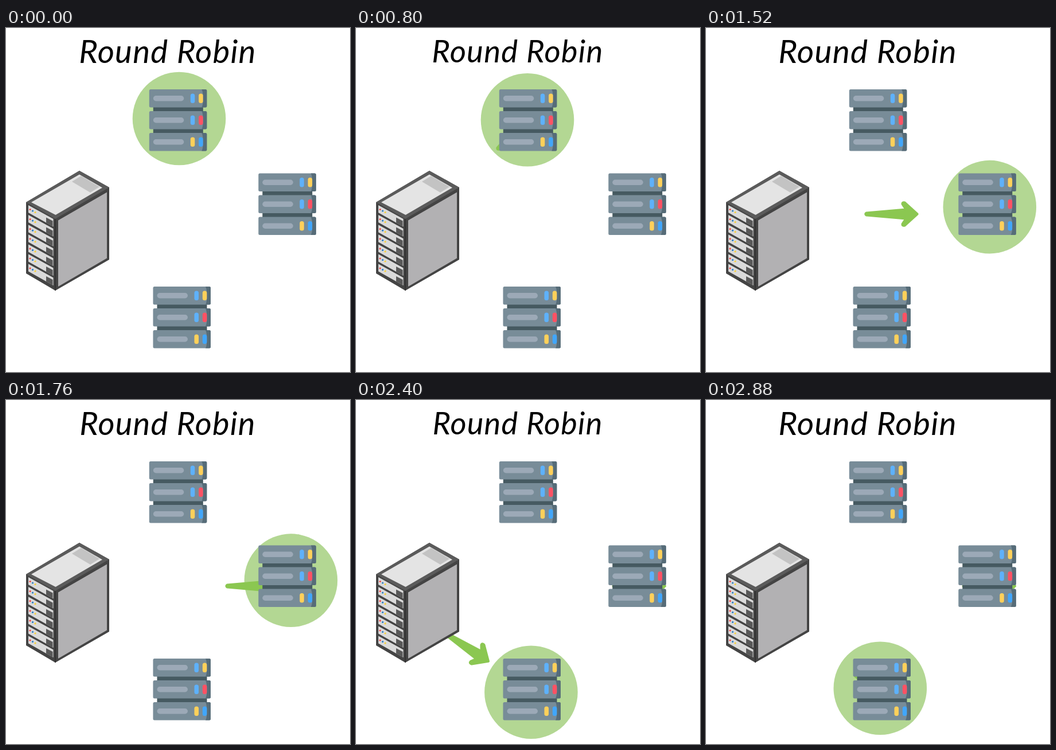
Recreate the animation shown at these times as an HTML page. Size 600 by 600 pixels, loop 2960 ms.

```html
<!DOCTYPE html>
<html lang="en">
<head>
<meta charset="utf-8">
<title>Round Robin</title>
<style>
  html, body { margin: 0; width: 100%; height: 100%; overflow: hidden; background: #fff; }
  svg { display: block; width: 100%; height: 100%; }
  #title { font: italic 56px Lato, "Open Sans", sans-serif; letter-spacing: 1.2px; text-anchor: middle; }
  .halo { fill: #b3d793; }
  .arrow { fill: #8bc751; stroke: #8bc751; stroke-width: 4; stroke-linejoin: round; }
</style>
</head>
<body>
<svg viewBox="0 0 600 600">
  <defs>
    <path id="arrow" d="M4-2 L73-8 L67-17 Q66-21 71-20 L93 0 L71 20 Q66 21 67 17 L73 8 L4 2 Q1 0 4-2Z"/>
    <g id="unit">
      <rect width="100.5" height="31.5" rx="2.5" fill="#788c98"/>
      <path d="M91.5 0H98a2.5 2.5 0 0 1 2.5 2.5V29a2.5 2.5 0 0 1-2.5 2.5H91.5Q94 27 94 16T91.5 0Z" fill="#566c78"/>
      <rect x="7" y="11" width="53.5" height="9.5" rx="4.75" fill="#9ca9b7"/>
    </g>
    <g id="server">
      <rect x="7" y="20" width="87" height="70" fill="#465a61"/>
      <g id="units"></g>
    </g>
  </defs>

  <text id="title" x="282" y="61">Round Robin</text>

  <circle class="halo" r="81.3"/>
  <circle class="halo" r="81.3"/>
  <circle class="halo" r="81.3"/>

  <use class="arrow" href="#arrow"/>
  <use class="arrow" href="#arrow"/>
  <use class="arrow" href="#arrow"/>

  <use href="#server" x="249.8" y="107"/>
  <use href="#server" x="440.3" y="253.5"/>
  <use href="#server" x="256.5" y="451"/>

  <g id="balancer">
    <path d="M128 249L180 278V404L86 458L35 428V304Z" fill="#444"/>
    <path d="M128 249L180 278L86 333L35 304Z" fill="#5b5b5b"/>
    <path d="M128 255.500L168 278.500L86.500 326L44 304Z" fill="#e4e4e4"/>
    <path d="M131 258L163 277L147 287L115 268Z" fill="#c3c3c3"/>
    <path d="M91 335.500L176 286.500V401.500L91 451Z" fill="#b2b1b3"/>
    <path d="M86 333V458" stroke="#333" stroke-width="2"/>
    <g id="slots"></g>
  </g>
</svg>
<script>
const LOOP = 2960, STEP = 80;
const $ = id => document.getElementById(id);
const BLUE = '#5eb1fb', YELLOW = '#ffd05a', RED = '#ff5264', AZURE = '#41a6fb';

const light = (x, color) =>
  `<rect x="${x}" y="7.500" width="7.500" height="16.500" rx="3.500" fill="${color}"/>`;
$('units').innerHTML = [[BLUE, YELLOW], [BLUE, RED], [YELLOW, AZURE]].map(([a, b], i) =>
  `<g transform="translate(0 ${i * 38})"><use href="#unit"/>${light(72, a)}${light(86.3, b)}</g>`).join('');

const dot = (x, y, color) => `<circle cx="${x}" cy="${y}" r="1.600" fill="${color}"/>`;
$('slots').innerHTML = Array.from({ length: 7 }, (_, i) =>
  `<g transform="translate(0 ${i * 17.1})">
    <path d="M39 309L82.500 333V346.500L39 322Z" fill="#dadada"/>
    <path d="M70 330.500L81.500 336.500V346L70 339.500Z" fill="#585858"/>
    ${dot(42, 316.5, '#ee4444')}${dot(46.5, 319, '#2b7fc4')}${dot(51, 321.5, '#f4cf36')}
  </g>`).join('');

// Value of a [time, ...values] track at t, held at both ends.
function sample(track, t, ease = p => p) {
  const i = track.findIndex(key => key[0] > t);
  if (i === 0) return track[0].slice(1);
  if (i < 0) return track[track.length - 1].slice(1);
  const a = track[i - 1], b = track[i];
  const p = ease((t - a[0]) / (b[0] - a[0]));
  return a.slice(1).map((v, k) => v + (b[k + 1] - v) * p);
}

const smooth = p => (1 - Math.cos(Math.PI * p)) / 2;

const titleWidth = [[0, 303], [200, 314], [480, 295], [640, 290], [800, 293], [1090, 314],
  [1200, 311], [1760, 301], [2400, 291], [2880, 305], [2960, 303]];

const halos = [
  { from: 0, to: 1000, track: [[0, 302, 158], [800, 299, 160.3]] },
  { from: 1000, to: 2040, track: [[1060, 491, 307.5], [1200, 492, 308.8], [1840, 497.6, 315.5]] },
  { from: 2040, to: LOOP, track: [[2160, 306.2, 513], [2400, 305.4, 509.7], [2880, 303.8, 502.7]] },
];

const arrows = [
  { angle: -43, track: [[53, 77, 381], [849, 256, 202]] },
  { angle: 0, track: [[1037, 62, 324.5], [1905, 446, 324.5]] },
  { angle: 33, track: [[2120, 62, 342], [2723, 258, 478]] },
];

const haloNodes = document.querySelectorAll('.halo');
const arrowNodes = document.querySelectorAll('.arrow');

function draw(now) {
  const t = Math.floor(now % LOOP / STEP) * STEP;
  const scale = sample(titleWidth, t, smooth)[0] / 301;
  $('title').setAttribute('transform', `translate(281.5 40) scale(${scale}) translate(-281.5 -40)`);
  halos.forEach(({ from, to, track }, i) => {
    haloNodes[i].setAttribute('visibility', t >= from && t < to ? 'visible' : 'hidden');
    haloNodes[i].setAttribute('transform', `translate(${sample(track, t)})`);
  });
  arrows.forEach(({ angle, track }, i) => {
    arrowNodes[i].setAttribute('visibility', t >= track[0][0] ? 'visible' : 'hidden');
    arrowNodes[i].setAttribute('transform', `translate(${sample(track, t)}) rotate(${angle})`);
  });
}

function tick() {
  draw(performance.now());
  requestAnimationFrame(tick);
}
tick();
</script>
</body>
</html>
```
